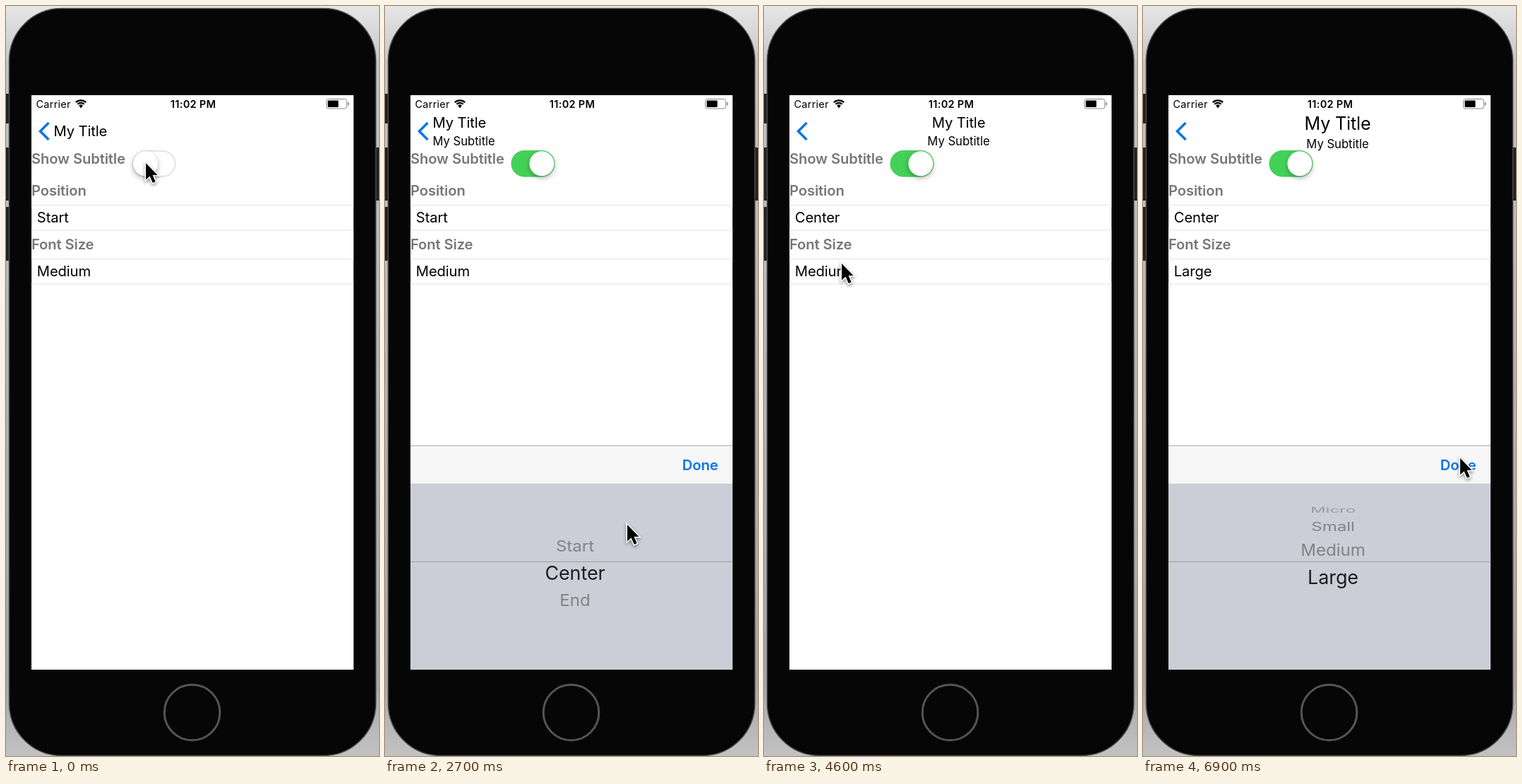
Write an HTML page with a canvas that moves like this. It is 528 by 1060 pixels and loops after 7000 ms.

```html
<!DOCTYPE html>
<html lang="en">
<head>
<meta charset="utf-8">
<title>Title settings</title>
<style>
  html, body { margin: 0; width: 100%; height: 100%; overflow: hidden; }
  canvas { display: block; }
</style>
</head>
<body>
<canvas id="stage" width="528" height="1060"></canvas>
<script>
const ctx = document.getElementById('stage').getContext('2d');
const LOOP = 7000, STEP = 100;
const SCREEN = { x: 36, y: 126, w: 456, h: 812 };
const SCREEN_BOTTOM = SCREEN.y + SCREEN.h;
const PICKER_TOP = 621.2, PICKER_TRAVEL = 317;
const BODY = 20.2, BLUE = '#0a73e8', GREY = '#777';

// Tracks hold [time, ...values]
const cursorTrack = [
  [0, 198, 222], [600, 198, 222], [1000, 125, 284], [1100, 122, 300], [1400, 122, 300],
  [1800, 265, 577], [2200, 318, 790], [2400, 333, 785], [2700, 343, 733], [2900, 453, 665],
  [3200, 457, 638], [3700, 457, 638], [4200, 117, 360], [4300, 117, 360], [4600, 110, 364],
  [4700, 110, 364], [5100, 275, 754], [5500, 305, 805], [5800, 320, 800], [6100, 335, 745],
  [6300, 452, 655], [6600, 449, 639], [7000, 449, 639]
];
const positionWheel = [[2300, 0], [2600, 1.1], [2700, 1.15], [2900, 1]];
const sizeWheel = [[5700, 2], [6200, 3.15], [6400, 3]];
const switchTrack = [[400, 0], [700, 1]];

const smooth = p => p * p * (3 - 2 * p);

function sample(track, t) {
  const next = track.findIndex(key => key[0] > t);
  if (next === 0) return track[0].slice(1);
  if (next < 0) return track[track.length - 1].slice(1);
  const a = track[next - 1], b = track[next];
  const p = smooth((t - a[0]) / (b[0] - a[0]));
  return a.slice(1).map((v, i) => v + (b[i + 1] - v) * p);
}

// Critically damped slide: 1 at the start, settling to 0
function settle(ms) {
  const k = Math.max(0, ms) * 0.01656;
  return (1 + k) * Math.exp(-k);
}

function pickerOffset(t) {
  if (t >= 4706) return PICKER_TRAVEL * settle(t - 4706);
  if (t >= 3569.6) return PICKER_TRAVEL * (1 - settle(t - 3569.6));
  return PICKER_TRAVEL * settle(t - 1400);
}

function text(str, x, y, size, { weight = 400, color = '#000', align = 'left', spacing = -0.12 } = {}) {
  ctx.font = `${weight} ${size}px Inter, "Liberation Sans", sans-serif`;
  ctx.letterSpacing = spacing + 'px';
  ctx.textAlign = align;
  ctx.fillStyle = color;
  ctx.fillText(str, x, y);
}

function rect(x, y, w, h, color) {
  ctx.fillStyle = color;
  ctx.fillRect(x, y, w, h);
}

function roundRect(x, y, w, h, r, { fill, stroke, line = 1 }) {
  ctx.beginPath();
  ctx.roundRect(x, y, w, h, r);
  if (fill) { ctx.fillStyle = fill; ctx.fill(); }
  if (stroke) { ctx.strokeStyle = stroke; ctx.lineWidth = line; ctx.stroke(); }
}

function withShadow(color, blur, dy, draw) {
  ctx.save();
  ctx.shadowColor = color;
  ctx.shadowBlur = blur;
  ctx.shadowOffsetY = dy;
  draw();
  ctx.restore();
}

// A hairline thinner than a pixel shows only where it covers a pixel centre
function hairline(y, color) {
  const row = Math.ceil(y - 0.5);
  if (row + 0.5 - y < 0.6) rect(SCREEN.x, row, SCREEN.w, 1, color);
}

function drawPhone() {
  const backdrop = ctx.createLinearGradient(0, 0, 0, 1060);
  backdrop.addColorStop(0, '#e6e6e6');
  backdrop.addColorStop(0.08, '#c4c4c4');
  backdrop.addColorStop(0.9, '#a6a6a6');
  backdrop.addColorStop(1, '#c2c2c2');
  rect(0, 0, 528, 1060, backdrop);
  for (const [x, y, h] of [[0, 124, 42], [0, 200, 75], [0, 284, 76], [522, 200, 75]])
    rect(x, y, 6, h, '#222');
  roundRect(4.5, 3.5, 519, 1056, 74, { fill: '#060606', stroke: '#4a4a4a', line: 1.5 });
  ctx.beginPath();
  ctx.arc(263.5, 998.5, 39.3, 0, Math.PI * 2);
  ctx.strokeStyle = '#555';
  ctx.lineWidth = 3;
  ctx.stroke();
  rect(SCREEN.x, SCREEN.y, SCREEN.w, SCREEN.h, '#fff');
}

function drawStatusBar() {
  text('Carrier', 42.5, 143.5, 14.5, { spacing: 0.25 });
  text('11:02 PM', 265, 143.5, 14.5, { weight: 600, align: 'center', spacing: 0.3 });
  const from = -Math.PI * 0.75, to = -Math.PI * 0.25;
  ctx.strokeStyle = '#000';
  ctx.lineWidth = 2.2;
  for (const r of [6.6, 10.2]) {
    ctx.beginPath();
    ctx.arc(106, 143.5, r, from, to);
    ctx.stroke();
  }
  ctx.beginPath();
  ctx.moveTo(106, 144.5);
  ctx.arc(106, 143.5, 4, from, to);
  ctx.fillStyle = '#000';
  ctx.fill();
  roundRect(453.5, 131.5, 29, 13.5, 3, { stroke: '#888' });
  roundRect(455.5, 133.5, 15, 9.5, 1, { fill: '#000' });
  roundRect(483.8, 136, 1.8, 4.5, 1, { fill: '#888' });
}

function drawHeader(subtitle, centered, large) {
  ctx.beginPath();
  ctx.moveTo(60.5, 165);
  ctx.lineTo(48.5, 177);
  ctx.lineTo(60.5, 189);
  ctx.strokeStyle = BLUE;
  ctx.lineWidth = 3.5;
  ctx.stroke();
  const x = centered ? 275.5 : 67.5, align = centered ? 'center' : 'left';
  const titleY = !subtitle ? 184 : large ? 174.5 : 172;
  text('My Title', x, titleY, large ? 25 : BODY, { align });
  if (subtitle) text('My Subtitle', x, large ? 201 : 197, 16.6, { align, spacing: 0 });
}

function drawSwitch(on) {
  roundRect(179.5, 204.8, 60, 36, 18, { fill: '#fff', stroke: '#e2e2e2', line: 1.8 });
  ctx.globalAlpha = on;
  roundRect(178.5, 204, 62, 37.5, 18.75, { fill: '#43d158' });
  ctx.globalAlpha = 1;
  withShadow('rgba(0,0,0,.3)', 7, 3, () =>
    roundRect(179.8 + 24.6 * on, 205.3, 35, 35, 17.5, { fill: '#fff' }));
}

function drawField(label, value, y) {
  text(label, 36, y, BODY, { weight: 600, color: GREY });
  roundRect(36.5, y + 13.5, 455, 35.5, 4, { fill: '#fff', stroke: '#e3e3e3' });
  text(value, 43.8, y + 37.5, BODY);
}

// Rows lie on a drum: height follows the sine, squash the cosine
function drawWheel(items, scroll, center) {
  const radius = 103.7, rowAngle = 21.8 * Math.PI / 180;
  items.forEach((item, i) => {
    const offset = i - scroll, angle = offset * rowAngle;
    const selected = Math.abs(offset) < 0.5;
    ctx.save();
    ctx.translate(269, center + radius * Math.sin(angle));
    ctx.scale(1, Math.cos(angle));
    const size = selected ? 26.8 : 24;
    const color = selected ? '#1d1d1f' : Math.abs(offset) > 2.5 ? '#98999e' : '#808287';
    text(item, 0, size * 0.363, size, { align: 'center', color, spacing: 0 });
    ctx.restore();
  });
}

function drawPicker(t) {
  const top = PICKER_TOP + pickerOffset(t);
  if (top > SCREEN_BOTTOM - 0.5) return;
  ctx.save();
  ctx.beginPath();
  ctx.rect(SCREEN.x, SCREEN.y, SCREEN.w, SCREEN.h);
  ctx.clip();
  const bar = Math.round(top), drum = Math.round(top + 53.8);
  rect(SCREEN.x, bar, SCREEN.w, drum - bar, '#f7f7f7');
  rect(SCREEN.x, drum, SCREEN.w, SCREEN_BOTTOM, '#cbced6');
  hairline(top, '#adadaf');
  const pressed = t >= 3500 && t < 4500;
  text('Done', 420.8, top + 34.3, BODY, { weight: 600, color: pressed ? '#67a9f1' : BLUE });
  const center = top + 185.8;
  if (t < 4500) drawWheel(['Start', 'Center', 'End'], sample(positionWheel, t)[0], center);
  else drawWheel(['Micro', 'Small', 'Medium', 'Large'], sample(sizeWheel, t)[0], center);
  hairline(top + 164, '#9fa1a8');
  hairline(top + 205.6, '#9fa1a8');
  ctx.restore();
}

function drawCursor(x, y) {
  ctx.save();
  ctx.translate(x, y);
  const arrow = new Path2D('M0 0V23.5L5.5 18.5L9.8 28L13.6 26.3L9.5 17H16.5Z');
  ctx.strokeStyle = '#fff';
  ctx.lineWidth = 3;
  withShadow('rgba(0,0,0,.45)', 4, 2, () => ctx.stroke(arrow));
  ctx.fillStyle = '#000';
  ctx.fill(arrow);
  ctx.restore();
}

function draw(t) {
  const centered = t >= 3000, large = t >= 6500;
  drawPhone();
  drawStatusBar();
  drawHeader(t >= 500, centered, large);
  text('Show Subtitle', 36, 223, BODY, { weight: 600, color: GREY });
  drawSwitch(sample(switchTrack, t)[0]);
  drawField('Position', centered ? 'Center' : 'Start', 268);
  drawField('Font Size', large ? 'Large' : 'Medium', 344);
  drawPicker(t);
  drawCursor(...sample(cursorTrack, t));
}

const start = performance.now();
function tick() {
  const t = (performance.now() - start) % LOOP;
  draw(Math.floor(t / STEP) * STEP);
  requestAnimationFrame(tick);
}
tick();
</script>
</body>
</html>
```
